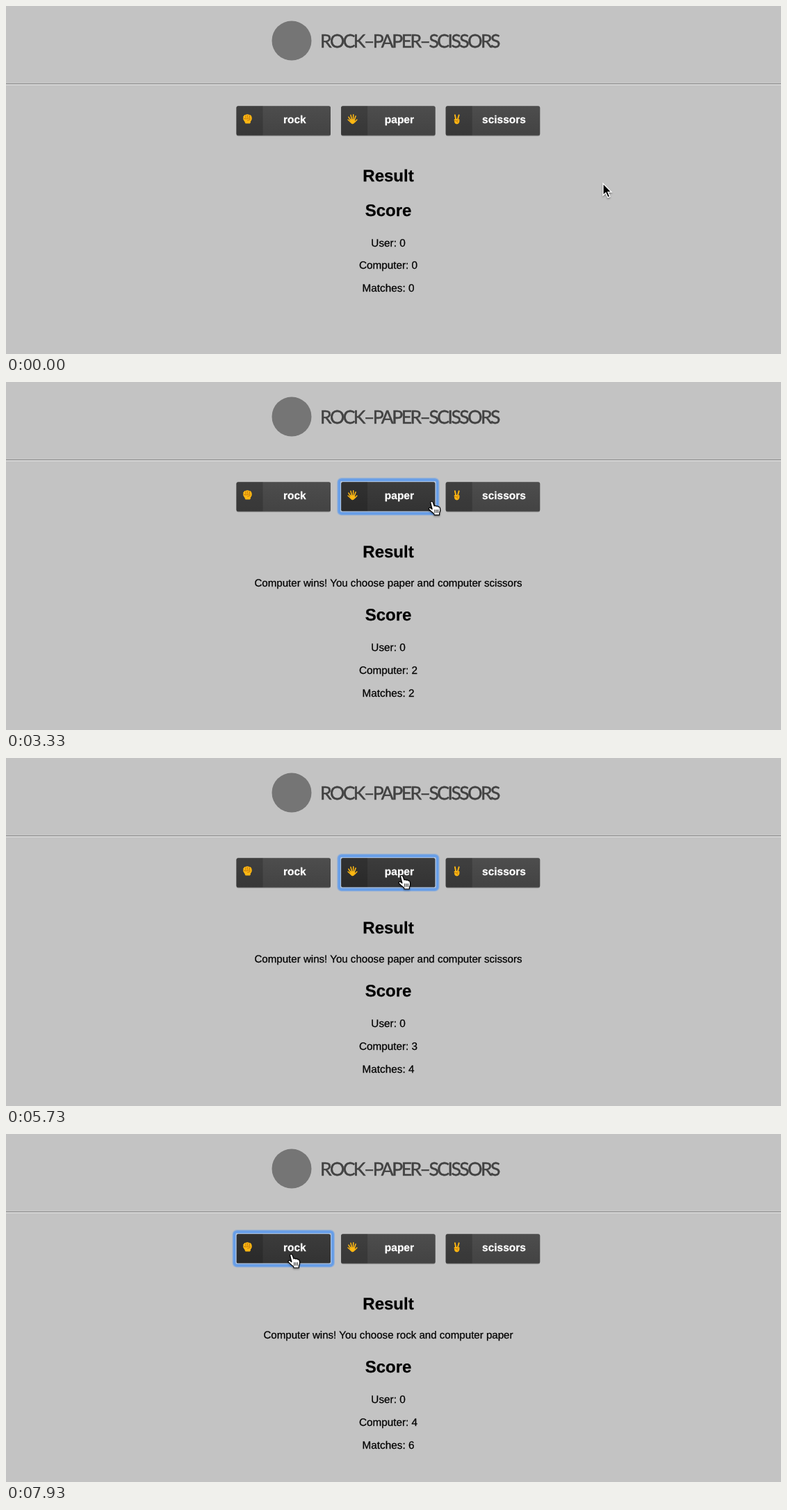
Animation of 1115 by 502 pixels, one loop 8000 ms. Source, as an HTML page:

```html
<!DOCTYPE html>
<html lang="en">
<head>
<meta charset="utf-8">
<title>Rock paper scissors</title>
<style>
  html, body { margin: 0; width: 100%; height: 100%; overflow: hidden; background: #c3c3c3; }
  svg { display: block; }
  text {
    text-anchor: middle; font: 15.3px "Liberation Sans", Arial, sans-serif;
    text-rendering: geometricPrecision; stroke: #000; stroke-width: .25;
  }
  .title { text-anchor: start; font: 26.5px Lato, sans-serif; letter-spacing: -2.5px; fill: #424242; stroke: #424242; stroke-width: .5; }
  .heading { font-size: 24px; font-weight: bold; }
  .label { font-size: 15.5px; font-weight: bold; fill: #fff; stroke: #fff; }
  #result { font-size: 15.1px; }
  .icon { fill: #fdb713; stroke: #fdb713; stroke-linecap: round; stroke-linejoin: round; }
  .crease { fill: none; stroke: #b86b08; stroke-width: .8; }
</style>
</head>
<body>
<svg width="1115" height="502" viewBox="0 0 1115 502">
  <defs>
    <linearGradient id="face" x2="0" y2="1"><stop stop-color="#4d4d4d"/><stop offset="1" stop-color="#434343"/></linearGradient>
    <linearGradient id="faceHover" x2="0" y2="1"><stop stop-color="#3c3c3c"/><stop offset="1" stop-color="#333"/></linearGradient>
    <filter id="shadow" x="-50%" y="-50%" width="200%" height="200%">
      <feDropShadow dx="0" dy="1.5" stdDeviation="1.2" flood-opacity=".4"/>
    </filter>
    <g id="rock" class="icon">
      <path d="M1.5 3.5Q2 1 4.5 1.2Q7 0 9 1.2Q12 1 12.5 4Q13.5 8 11 10.5L10.5 13H4L3.5 11Q0 8 1.5 3.5Z"/>
      <path class="crease" d="M4.5 2V5.5M7.2 1.5V5M10 2V5M2 6.5Q5 8 9 5.8Q11.5 6 10.5 7.8L7 9"/>
    </g>
    <g id="paper" class="icon">
      <path d="M4.5 8H10.5L10.5 11.5Q9.5 13.8 7.5 13.8Q5.5 13.8 4.7 12Z"/>
      <path fill="none" stroke-width="1.6" d="M4.8 9L1.8 4.2M6.4 8L4.9 1.3M8.3 8L8.7 .9M10 8.5L12 2.7M10.5 11.5L13.8 8M4.8 11.5L1 8"/>
    </g>
    <g id="scissors" class="icon">
      <path d="M3.8 7.5H10.2V11Q9.5 14 7 14Q4 14 3.8 11Z"/>
      <path fill="none" stroke-width="1.9" d="M5.6 8L4.2 1.3M8 8L10 1.3"/>
      <path class="crease" d="M4 9L6.5 10L9 8.2M7 10.2Q8.7 10.5 8.3 12"/>
    </g>
  </defs>

  <rect width="1115" height="502" fill="#c3c3c3"/>
  <circle cx="411" cy="50" r="28.5" fill="#757575"/>
  <text class="title" x="452" y="60">ROCK–PAPER–SCISSORS</text>
  <path d="M0 112.5H1115" stroke="#808080"/>
  <path d="M0 113.5H1115" stroke="#f2f2f2"/>

  <g id="buttons"></g>
  <g id="focus" fill="none" stroke="#679ee8">
    <rect x="-5.2" y="138.8" width="146" height="53" rx="5.5" stroke-width="1.4" opacity=".45"/>
    <rect x="-2.9" y="141.1" width="141.4" height="48.4" rx="3.5" stroke-width="3.8"/>
    <rect x="-.5" y="143.5" width="136.5" height="43.5" rx="2.5" stroke="#a9c6ec"/>
  </g>

  <text class="heading" x="550" y="252.5">Result</text>
  <text id="result" x="550" y="295"></text>
  <g id="score">
    <text class="heading" x="550" y="302.5">Score</text>
    <text x="550" y="346.5">User: 0</text>
    <text id="computer" x="550" y="379"></text>
    <text id="matches" x="550" y="412"></text>
  </g>

  <g id="cursor" filter="url(#shadow)">
    <path id="arrow" d="M0 0V17L3.9 13.4L6.9 20.2L9.8 18.9L6.9 12.3H12Z" stroke="#fff" stroke-width="1.3"/>
    <g id="hand" transform="translate(0 1)" stroke="#000" stroke-width="1.2" stroke-linejoin="round" stroke-linecap="round">
      <path fill="#fff" d="M-2.5 1.8C-2 0 .2-.3 1 1.7L3 7Q4.5 5.7 5.7 7.3Q7.4 6.3 8.5 8Q10.8 7.6 11.3 10C12 13 11.5 15 10.4 17V20H3L2.5 18Q-1.5 15-4.6 11.8C-5.6 10.2-3.8 8.6-2 10L-.1 11.5Z"/>
      <path fill="none" stroke-width=".9" d="M3.7 12.5V16.5M6 12.5V16.5M8.3 12.5V16.5"/>
    </g>
  </g>
</svg>

<script>
const LOOP = 8000, FRAME = 1000 / 15, FIRST_CLICK = 460;
const byId = id => document.getElementById(id);
const choices = ["rock", "paper", "scissors"];
const buttonX = i => 331.5 + 150.6 * i;
const loses = (user, computer) => `Computer wins! You choose ${user} and computer ${computer}`;
const tie = "It's a tie!";

// [start, end, x, y]: pointer travel to a new resting place
const moves = [
  [0, 0, 859, 256],
  [10, 270, 371, 171],
  [2140, 2470, 542, 172],
  [3200, 3530, 741, 169],
  [4410, 4870, 570, 168],
  [5810, 6200, 741, 169],
  [6870, 7326, 411, 172]
];
// [time, button]: focus moves as the mouse goes down
const focuses = [[0, -1], [FIRST_CLICK, 0], [2720, 1], [3860, 2], [5190, 1], [6390, 2], [7720, 0]];
// [time, result, computer, matches]
const results = [
  [0, "", 0, 0],
  [590, loses("rock", "paper"), 1, 1],
  [2860, loses("paper", "scissors"), 2, 2],
  [4060, tie, 2, 3],
  [5325, loses("paper", "scissors"), 3, 4],
  [6525, tie, 3, 5],
  [7860, loses("rock", "paper"), 4, 6]
];

byId("buttons").innerHTML = choices.map((name, i) => `
  <g transform="translate(${buttonX(i)} 144)">
    <rect y=".8" width="135.5" height="42.7" rx="2.5" opacity=".4"/>
    <rect class="face" y=".3" width="135.5" height="42.2" rx="2.5"/>
    <path d="M2.5 .3H38V42.5H2.5Q0 42.5 0 40V2.8Q0 .3 2.5 .3Z" opacity=".18"/>
    <use href="#${name}" x="9" y="12"/>
    <text class="label" x="83.8" y="25.4">${name}</text>
  </g>`).join("");
const faces = [...document.querySelectorAll(".face")];

const latest = (list, t) => list.filter(item => item[0] <= t).pop();

function pointerAt(t) {
  let [, , x, y] = moves[0];
  for (const [start, end, toX, toY] of moves.slice(1)) {
    const u = Math.min(1, Math.max(0, (t - start) / (end - start)));
    const eased = u * u * (3 - 2 * u);
    x += (toX - x) * eased;
    y += (toY - y) * eased;
  }
  return { x, y };
}

function draw(t) {
  const { x, y } = pointerAt(t);
  const active = t >= FIRST_CLICK;
  byId("cursor").setAttribute("transform", `translate(${x} ${y})`);
  byId("arrow").style.display = active ? "none" : "";
  byId("hand").style.display = active ? "" : "none";

  // hover trails the pointer by one frame
  const hoverX = pointerAt(t - FRAME).x;
  faces.forEach((face, i) => {
    const offset = hoverX - buttonX(i);
    const hovered = active && offset >= 0 && offset <= 136;
    face.setAttribute("fill", hovered ? "url(#faceHover)" : "url(#face)");
  });

  const focused = latest(focuses, t)[1];
  byId("focus").style.display = focused < 0 ? "none" : "";
  byId("focus").setAttribute("transform", `translate(${buttonX(focused)} 0)`);

  const [, result, computer, matches] = latest(results, t);
  byId("result").textContent = result;
  byId("computer").textContent = `Computer: ${computer}`;
  byId("matches").textContent = `Matches: ${matches}`;
  byId("score").setAttribute("transform", `translate(0 ${result ? 41.5 : 0})`);
}

function tick() {
  const t = performance.now() % LOOP;
  draw(Math.floor((t + 5) / FRAME) * FRAME);
  requestAnimationFrame(tick);
}
tick();
</script>
</body>
</html>
```
